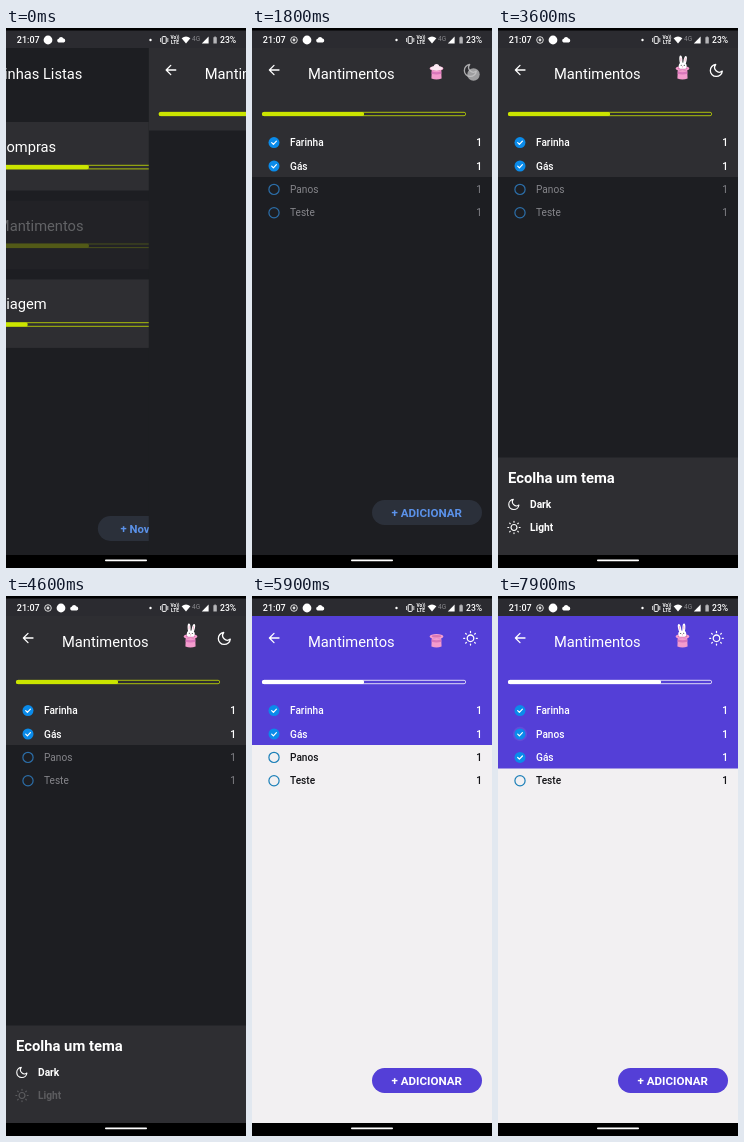
Animation of 240 by 540 pixels, one loop 8 s. Source, as an HTML page:

```html
<!DOCTYPE html>
<html lang="pt">
<head>
<meta charset="utf-8">
<title>Lista de mantimentos</title>
<style>
html, body { margin: 0; width: 100%; height: 100%; overflow: hidden; background: #000; }
svg {
  display: block; width: 100vw; height: 100vh; font-family: Roboto, Arial, sans-serif;
  --bg: #1d1e22; --head: #2e2e32; --bar: #cbe500; --dim: #85858a;
  --btn: #2b303a; --btn-text: #5b92ea; --ring: #2c6ea8;
}
svg.light {
  --bg: #f2f0f2; --head: #543fd7; --bar: #fff; --dim: #141418;
  --btn: #543fd7; --btn-text: #fff; --ring: #1b7fb8;
}
text { fill: #fff; }
.bg { fill: var(--bg); }
.head { fill: var(--head); }
.title { font-size: 14.7px; }
.item { font-size: 10.1px; font-weight: 500; }
.todo text { fill: var(--dim); font-weight: 400; }
.light .todo text { font-weight: 500; }
.bold { font-weight: 700; }
.btn { fill: var(--btn); }
.btn-text { fill: var(--btn-text); font-weight: 700; text-anchor: middle; }
.fill { fill: var(--bar); }
.track { fill: none; stroke: var(--bar); stroke-width: .8; }
.line { fill: none; stroke: #fff; stroke-width: 1.3; stroke-linecap: round; stroke-linejoin: round; }
.ring { fill: none; stroke: var(--ring); stroke-width: 1.2; }
.todo .check, .done .ring { display: none; }
</style>
</head>
<body>
<svg id="stage" viewBox="0 0 240 540">
  <defs>
    <clipPath id="aboveHat"><rect x="174" y="22" width="22" height="18.8"/></clipPath>
    <path id="moon" class="line" d="M5.8 .8A6 6 0 1 1-.8-5.8A4.7 4.7 0 0 0 5.8 .8Z"/>
    <g id="sun" class="line">
      <circle r="3.3"/>
      <path d="M0-6.8V-5.8M0 6.8V5.8M-6.8 0H-5.8M6.8 0H5.8M-4.8-4.8L-4.2-4.2M4.8 4.8L4.2 4.2M-4.8 4.8L-4.2 4.2M4.8-4.8L4.2-4.2"/>
    </g>
  </defs>

  <g id="lists">
    <rect class="bg" y="20" width="260" height="507"/>
    <text class="title" x="14.3" y="51">Minhas Listas</text>
    <g id="cards"></g>
    <rect class="btn" x="121" y="488" width="110" height="25" rx="12.5"/>
    <text class="btn-text" font-size="11.3" x="175" y="505">+ Nova Lista</text>
  </g>

  <g id="page">
    <rect class="bg" y="20" width="240" height="507"/>
    <rect class="head" y="20" width="240" height="82.5"/>
    <rect class="head" id="doneBg" y="102" width="240" height="47"/>
    <path class="line" d="M27 42H17.5M22 37.4L17.4 42L22 46.6"/>
    <text class="title" x="56" y="50.5">Mantimentos</text>
    <g id="hat">
      <ellipse cx="184.5" cy="40.6" rx="6.9" ry="2.5" fill="#f7a0cf"/>
      <ellipse cx="184.5" cy="40.3" rx="4.8" ry="1.2" fill="#d877b4"/>
      <g clip-path="url(#aboveHat)">
        <g id="rabbit" fill="#fff">
          <ellipse cx="182.3" cy="32" rx="1.5" ry="4.3" transform="rotate(-8 182.3 32)"/>
          <ellipse cx="186.6" cy="32" rx="1.5" ry="4.3" transform="rotate(8 186.6 32)"/>
          <path d="M182.3 29.8V33.4M186.6 29.8V33.4" stroke="#f5b3cf" stroke-width=".9"/>
          <ellipse cx="184.5" cy="38" rx="4" ry="3.6"/>
          <circle cx="183" cy="37.3" r=".55" fill="#333"/>
          <circle cx="186" cy="37.3" r=".55" fill="#333"/>
          <circle cx="184.5" cy="38.8" r=".6" fill="#ee8fb8"/>
        </g>
      </g>
      <path d="M179.8 41.8Q184.5 43.6 189.2 41.8L189.6 50.4Q184.5 52.4 179.4 50.4Z" fill="#f49bcd"/>
      <path d="M179.7 43.3Q184.5 45 189.3 43.3V45.8Q184.5 47.4 179.6 45.8Z" fill="#d977bb"/>
      <g id="puff" fill="#fbe9f2">
        <ellipse cx="184.5" cy="40.2" rx="6.2" ry="2.2"/>
        <circle cx="184.5" cy="38.8" r="2.7"/>
      </g>
    </g>
    <use id="moonBtn" href="#moon" x="218.5" y="42.3"/>
    <use id="sunBtn" href="#sun" x="218.5" y="42.3"/>
    <rect class="track" x="10.6" y="84.3" width="203" height="3.4" rx="1.5"/>
    <rect class="fill" id="progress" x="10" y="83.9" height="4.2" rx="1.6"/>
    <g id="rows"></g>
    <rect class="btn" x="120" y="472" width="110" height="25" rx="12.5"/>
    <text class="btn-text" font-size="11.6" x="174.7" y="488.8">+ ADICIONAR</text>
  </g>

  <g id="sheet">
    <rect class="head" y="429.5" width="240" height="98"/>
    <text class="bold" font-size="14.8" x="10" y="455">Ecolha um tema</text>
    <use href="#moon" transform="translate(16 476.3) scale(.85)"/>
    <text class="bold" font-size="10.2" x="32" y="480">Dark</text>
    <g id="lightItem">
      <use href="#sun" transform="translate(16 499.5) scale(.9)"/>
      <text class="bold" font-size="10.2" x="32" y="503.2">Light</text>
    </g>
  </g>

  <circle id="touch" r="6.2" fill="#c4c4c6" opacity=".75"/>

  <rect width="240" height="20" fill="#2b2b30"/>
  <rect width="240" height="2.5" fill="#000"/>
  <text x="10.8" y="15.2" font-size="9" font-weight="500">21:07</text>
  <g id="recIcon">
    <circle cx="42" cy="12" r="3.3" fill="none" stroke="#ddd"/>
    <circle cx="42" cy="12" r="1.4" fill="#ddd"/>
  </g>
  <g id="notices" fill="#fff">
    <circle cx="42" cy="12" r="4.4"/>
    <path d="M52.6 14.5a1.9 1.9 0 0 1 .1-3.7a2.6 2.6 0 0 1 4.8-.2a2 2 0 0 1 .3 3.9Z"/>
  </g>
  <g fill="#fff">
    <circle cx="144.5" cy="12" r="1.2"/>
    <rect x="156.2" y="8.6" width="4" height="6.8" rx=".8" fill="none" stroke="#fff"/>
    <path d="M154.6 10V14M161.8 10V14" stroke="#fff" stroke-width=".8"/>
    <text x="169" y="11.4" font-size="4.8" font-weight="700" text-anchor="middle">Vo))</text>
    <text x="169" y="16" font-size="4.8" font-weight="700" text-anchor="middle">LTE</text>
    <path d="M175.6 10.2Q180 6.6 184.4 10.2L180 15.6Z"/>
    <text x="186" y="13" font-size="6.5" style="fill:#88888c">4G</text>
    <path d="M195.8 15.4H202.6V8.6Z"/>
    <path d="M207.4 9.3H208.4V8.5H209.8V9.3H210.8V15.5H207.4Z" fill="#b5b5b8"/>
    <text x="214" y="15.2" font-size="8.6" font-weight="500">23%</text>
  </g>
  <rect y="527" width="240" height="13" fill="#000"/>
  <rect x="99" y="531.6" width="42" height="1.6" rx=".8" fill="#fff"/>
</svg>
<script>
const LOOP = 8000, THEME = 4800, TOGGLE = 7250;
const $ = id => document.getElementById(id);
const clamp = v => Math.max(0, Math.min(1, v));
const ramp = (t, a, b) => clamp((t - a) / (b - a));
const smooth = u => u * u * (3 - 2 * u);
const easeOut = u => 1 - (1 - u) ** 3;
const show = (el, on) => el.setAttribute('visibility', on ? 'visible' : 'hidden');
const move = (el, x, y) => el.setAttribute('transform', `translate(${x} ${y})`);
const rowY = i => 114.6 + 23.4 * i;

$('cards').innerHTML = [['Compras', .5], ['Mantimentos', .5], ['Viagem', .2]].map(([name, part], i) => `
  <g transform="translate(0 ${94 + 78.7 * i})">
    <rect class="head" width="240" height="68.5"/>
    <text class="title" x="20" y="30">${name}</text>
    <rect class="track" x="10.6" y="43.3" width="203" height="3.6" rx="1.5"/>
    <rect class="fill" x="10" y="43" width="${204 * part}" height="4.2" rx="1.6"/>
  </g>`).join('');
const pressedCard = $('cards').children[1];

$('rows').innerHTML = ['Farinha', 'Gás', 'Panos', 'Teste'].map(name => `
  <g class="item">
    <circle class="halo" cx="22" r="7.2" fill="#fff"/>
    <g class="check">
      <circle cx="22" r="5.5" fill="#0a8bea"/>
      <path class="line" style="stroke-width:1.2" d="M19.7 .1L21.4 1.8L24.4-1.4"/>
    </g>
    <circle class="ring" cx="22" r="5.1"/>
    <text x="38" y="3.6">${name}</text>
    <text x="227" y="3.6" text-anchor="middle">1</text>
  </g>`).join('');
const rows = [...$('rows').children].map(el => ({
  el, halo: el.querySelector('.halo'), ring: el.querySelector('.ring')
}));

// Show-taps marker: start, end, x, y
const taps = [[1680, 1890, 221.5, 46.5], [4280, 4590, 54, 505], [7020, 7190, 62, 163]];

function drawRows(t) {
  const toggled = t >= TOGGLE;
  const order = toggled ? [0, 2, 1, 3] : [0, 1, 2, 3];
  const doneCount = toggled ? 3 : 2;
  const slide = -40 * (1 - ramp(t, 80, 720)) ** 3;
  show($('rows'), t >= 80);
  show($('doneBg'), t >= 80);
  $('doneBg').setAttribute('height', 23.5 * doneCount);
  order.forEach((id, place) => {
    const { el, halo, ring } = rows[id];
    const done = place < doneCount;
    const age = ramp(t, id === 2 ? TOGGLE : 80, id === 2 ? TOGGLE + 720 : 800);
    el.setAttribute('class', 'item ' + (done ? 'done' : 'todo'));
    move(el, slide, rowY(place));
    halo.setAttribute('opacity', done ? (id === 2 ? .4 : 1) * (1 - age * age) : 0);
    ring.setAttribute('stroke-dasharray', t < 650 ? '2 1.2' : 'none');
  });
  const part = .5 + .25 * easeOut(ramp(t, TOGGLE, TOGGLE + 450));
  $('progress').setAttribute('width', 204 * part);
}

function drawHat(t) {
  const up = smooth(ramp(t, 1650, 2150)) - smooth(ramp(t, 4800, 5200)) + smooth(ramp(t, 6650, 7150));
  const tilt = 5 * Math.sin((t - 2700) / 1200);
  $('rabbit').setAttribute('transform', `translate(0 ${14 * (1 - up)}) rotate(${up * tilt} 184.5 41)`);
  const puff = Math.max(...[1680, 6680].map(a => ramp(t, a, a + 100) * (1 - ramp(t, a + 200, a + 360))));
  $('puff').setAttribute('opacity', puff);
}

function draw(t) {
  const light = t >= THEME;
  $('stage').setAttribute('class', light ? 'light' : 'dark');

  const x = 144 * (1 - ramp(t, 0, 350)) ** 3;
  move($('page'), x, 0);
  move($('lists'), -.3 * (240 - x), 0);
  pressedCard.setAttribute('opacity', .3 + .7 * smooth(ramp(t, 40, 290)));

  drawRows(t);
  drawHat(t);

  show($('moonBtn'), !light);
  show($('sunBtn'), light);
  $('moonBtn').setAttribute('opacity', 1 - .4 * ramp(t, 1700, 1800) * (1 - ramp(t, 1850, 2000)));

  const open = easeOut(ramp(t, 1880, 2250)) - smooth(ramp(t, 4790, 5120));
  show($('sheet'), open > 0);
  move($('sheet'), 0, 98 * (1 - open));
  $('lightItem').setAttribute('opacity', 1 - .78 * ramp(t, 4330, 4480) * (1 - ramp(t, 4790, 5000)));

  const tap = taps.find(([a, b]) => t >= a && t < b);
  show($('touch'), tap);
  if (tap) move($('touch'), tap[2], tap[3]);

  show($('recIcon'), t >= 700);
  move($('notices'), t >= 700 ? 13 : 0, 0);
}

const start = performance.now();
function tick() {
  draw((performance.now() - start) % LOOP);
  requestAnimationFrame(tick);
}
tick();
</script>
</body>
</html>
```
